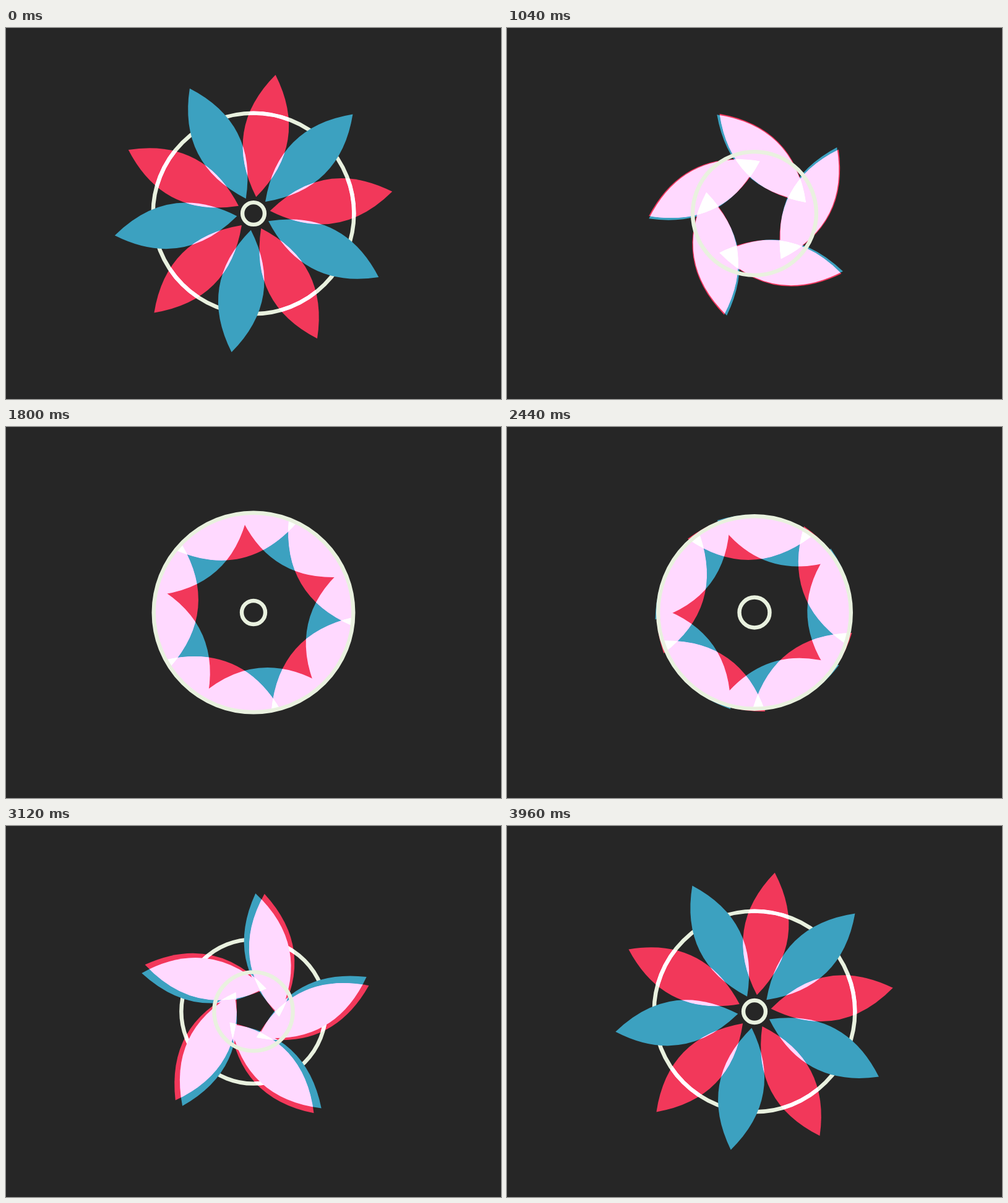
Recreate the animation shown at these times as an HTML page with a canvas. Size 800 by 600 pixels, loop 4 s.

```html
<!DOCTYPE html>
<html lang="en">
<head>
<meta charset="utf-8">
<title>Petals</title>
<style>
  html, body { margin: 0; width: 100%; height: 100%; overflow: hidden; background: #262626; }
  canvas { display: block; width: 800px; height: 600px; }
</style>
</head>
<body>
<canvas id="stage" width="800" height="600"></canvas>
<script>
const ctx = document.getElementById('stage').getContext('2d');
const LOOP = 4000;
const PETALS = 5;
const STEP = 2 * Math.PI / PETALS;
const REACH = 127;
const RING_MIN = 17.9;
const RING_MAX = 162.4;
const COLORS = { red: '#F2385A', blue: '#3CA1C0', ring: '#E9F1DF' };

const rad = deg => deg * Math.PI / 180;
const mix = (a, b, k) => a + (b - a) * k;

// cubic-bezier(.7, 0, .3, 1), solved by bisection
function ease(x) {
  let lo = 0, hi = 1;
  for (let i = 0; i < 30; i++) {
    const s = (lo + hi) / 2, r = 1 - s;
    if (2.1 * r * r * s + 0.9 * r * s * s + s * s * s < x) lo = s; else hi = s;
  }
  return lo * lo * (3 - 2 * lo);
}

const petal = new Path2D('M0 -100 Q72 0 0 100 Q-72 0 0 -100Z');

function drawPetals(color, angle, slide, mode) {
  ctx.globalCompositeOperation = mode;
  ctx.fillStyle = color;
  for (let i = 0; i < PETALS; i++) {
    ctx.save();
    ctx.rotate(angle + i * STEP);
    ctx.translate(REACH * slide, REACH * (slide - 1));
    ctx.fill(petal);
    ctx.restore();
  }
}

function drawRing(radius) {
  ctx.globalCompositeOperation = 'source-over';
  ctx.strokeStyle = COLORS.ring;
  ctx.lineWidth = 6.4;
  ctx.beginPath();
  ctx.arc(0, 0, radius, 0, 2 * Math.PI);
  ctx.stroke();
}

function draw(time) {
  const phase = (time % LOOP) / LOOP;
  const slide = phase < 0.5 ? ease(phase * 2) : 1 - ease(phase * 2 - 1);
  const turn = STEP * phase;

  ctx.setTransform(1, 0, 0, 1, 0, 0);
  ctx.clearRect(0, 0, 800, 600);
  ctx.translate(400, 300);

  drawRing(mix(RING_MAX, RING_MIN, slide));
  drawPetals(COLORS.blue, rad(45) - turn, slide, 'source-over');
  drawPetals(COLORS.red, rad(9) + turn, slide, 'lighter');
  drawRing(mix(RING_MIN, RING_MAX, slide));
}

const start = performance.now();
function tick() {
  draw(performance.now() - start);
  requestAnimationFrame(tick);
}
tick();
</script>
</body>
</html>
```
